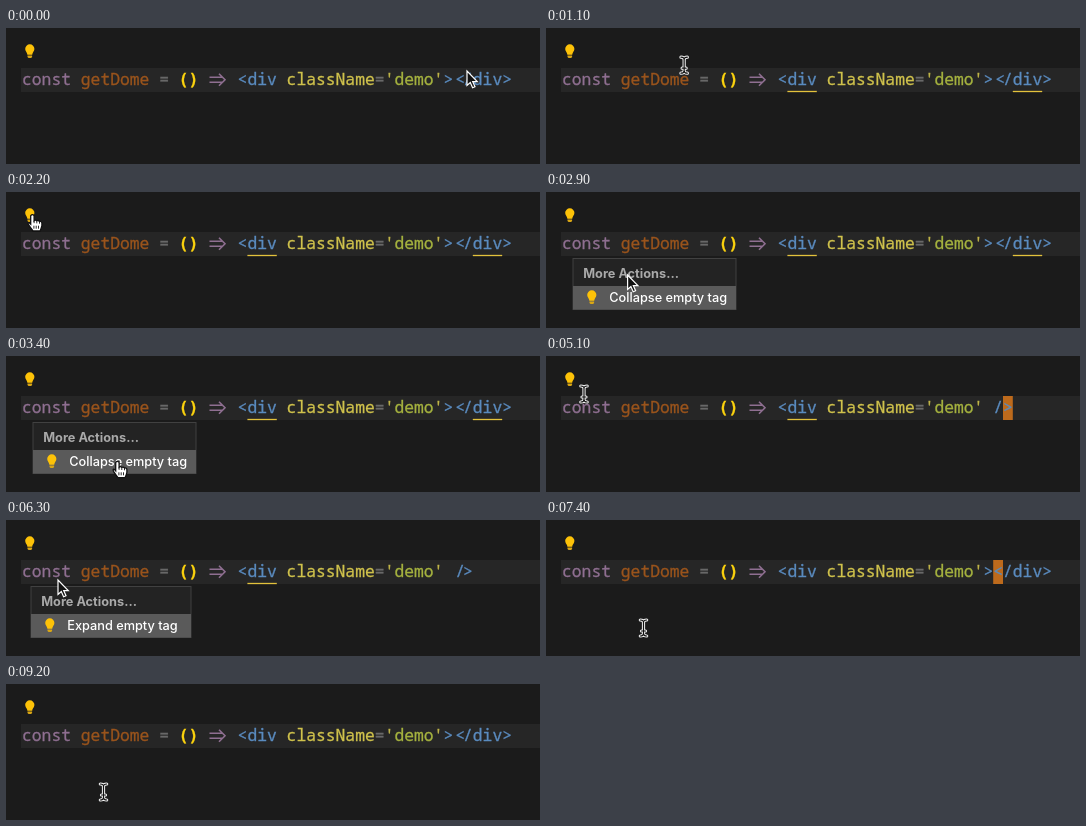
Animation, 534 px wide and 136 px high, one loop 9300 ms. Source, as an HTML page:

```html
<!DOCTYPE html>
<html lang="en">
<head>
<meta charset="utf-8">
<title>Empty tag actions</title>
<style>
html, body { margin: 0; width: 100%; height: 100%; overflow: hidden; background: #1b1b1b; }
svg { display: block; width: 534px; height: 136px; }
#code { font: 500 16.33px "Noto Sans Mono", monospace; }
#code text { stroke-width: .3px; }
#menu { font: 500 12.75px Inter, sans-serif; }
</style>
</head>
<body>
<svg viewBox="0 0 534 136">
  <defs>
    <g id="bulb">
      <path d="M-4.6-2.6A4.6 4.6 0 0 1 4.6-2.6C4.6-.3 2.6 .8 2.4 3.2H-2.4C-2.6 .8-4.6-.3-4.6-2.6Z" fill="#fdc208"/>
      <path d="M-2.3 4H2.3V5.6L1.3 6.6H-1.3L-2.3 5.6Z" fill="#d9a614"/>
    </g>
    <path id="beamLine" d="M-3.2-8Q0-8 0-5.5V5.5Q0 8-3.2 8M3.2-8Q0-8 0-5.5M0 5.5Q0 8 3.2 8M-2 3H2" fill="none" stroke-linecap="round"/>
  </defs>
  <rect x="15" y="40" width="519" height="24" fill="#262626"/>
  <use href="#bulb" x="23.8" y="23.5"/>
  <rect id="block" y="40" width="9.8" height="24" fill="#bd6a1c"/>
  <g id="code">
    <path d="M203.5 49.3H216M203.5 54.3H216M213 45.8L219 51.8L213 57.8" fill="none" stroke="#8f6f91" stroke-width="1.6"/>
  </g>
  <path id="openLine" d="M241.4 63.5H270.8" stroke="#e3c23c" stroke-width="1.3"/>
  <path id="closeLine" d="M466.8 63.5H496.2" stroke="#e3c23c" stroke-width="1.3"/>
  <g id="menu">
    <rect id="panel" x=".5" y="66.5" height="51" fill="#232323" stroke="#414141"/>
    <rect id="row" x=".5" y="94" height="23.5" fill="#5a5a5a"/>
    <text x="10.7" y="85.5" fill="#a9a9a9" font-weight="700">More Actions...</text>
    <use href="#bulb" x="19.3" y="105.5"/>
    <text id="action" x="36.7" y="110" fill="#fff"></text>
  </g>
  <g id="pointer">
    <path id="arrow" d="M0 0V14.5L3.3 11.5 5.6 16.8 8 15.8 5.7 10.6H10.3Z" fill="#111" stroke="#fff" stroke-width="1.2"/>
    <g id="hand" stroke="#111">
      <path d="M-1.8 1Q0-1 1.6 1V6Q3 4.7 4.3 6.1Q6 5.2 7 6.7Q9.4 6.3 9.4 8.5V11Q9 13 7.6 16.3H.5Q-2 13-4 10Q-5 7.5-3.2 8L-1.8 9.5Z" fill="#fff" stroke-width="1.3"/>
      <path d="M1.6 6V8.5M4.3 6.1V8.7M7 6.7V9M1.4 11V14M3.7 11V14M6 11V14" stroke-width=".9"/>
    </g>
    <g id="beam">
      <use href="#beamLine" stroke="#f4f4f4" stroke-width="3.2"/>
      <use href="#beamLine" stroke="#111" stroke-width="1.2"/>
    </g>
  </g>
</svg>
<script>
const LOOP = 9300, STEP = 100, LEFT = 16, CELL = 9.8;
const CLICK = 300, COLLAPSE = 3800, EXPAND = 7300;
const TAG = '#5a8bbf', DIM = '#686868', QUOTE = '#c0b548';
const $ = id => document.getElementById(id);
const column = n => LEFT + n * CELL;
const show = (el, on) => el.setAttribute('visibility', on ? 'visible' : 'hidden');
const set = (el, attrs) => Object.entries(attrs).forEach(([k, v]) => el.setAttribute(k, v));

function token(col, text, color, weight = 500) {
  const el = document.createElementNS('http://www.w3.org/2000/svg', 'text');
  set(el, { x: column(col), y: 57, fill: color, stroke: color, 'font-weight': weight });
  el.textContent = text;
  return $('code').appendChild(el);
}

token(0, 'const', '#8f6f91');
token(6, 'getDome', '#9a541c');
token(14, '=', DIM);
token(16, '()', '#fbd20e', 700);
token(22, '<div', TAG);
token(27, 'className', '#d0c24c');
token(36, '=', DIM);
token(37, "'", QUOTE);
token(38, 'demo', '#a5b23f');
token(42, "'", QUOTE);
const closing = [token(43, '>', TAG), token(46, 'div>', TAG)];
const pair = [token(44, '', TAG), token(45, '', TAG)];

// time, x, y, shape used from that time on
const path = [
  [0, 461, 43, 'arrow'], [300, 461, 46, 'beam'], [400, 455, 48, 'beam'],
  [1000, 150, 40, 'beam'], [1500, 36, 13, 'arrow'], [1900, 26.5, 22.7, 'hand'],
  [2500, 26.5, 22.7, 'arrow'], [3000, 88, 90, 'hand'], [3300, 111.5, 105.3, 'hand'],
  [3700, 111.5, 105.3, 'beam'], [4000, 60, 52, 'beam'], [4500, 38, 38, 'beam'],
  [5100, 38, 38, 'beam'], [5400, 26, 22, 'hand'], [5600, 26, 22, 'arrow'],
  [6000, 52, 60, 'arrow'], [6300, 52, 60, 'arrow'], [6700, 80, 92, 'hand'],
  [7000, 97.5, 108, 'hand'], [7300, 97.5, 108, 'beam'], [LOOP, 97.5, 108, 'beam']
];

function drawPointer(t) {
  const i = path.findIndex(key => key[0] > t);
  const [t0, x0, y0, shape] = path[i - 1], [t1, x1, y1] = path[i];
  const p = (t - t0) / (t1 - t0), e = p * p * (3 - 2 * p);
  set($('pointer'), { transform: `translate(${x0 + (x1 - x0) * e} ${y0 + (y1 - y0) * e})` });
  for (const id of ['arrow', 'hand', 'beam']) show($(id), id === shape);
}

function drawMenu(t) {
  const first = t >= 2400 && t < 3700, second = t >= 5500 && t < EXPAND;
  const width = first ? 164 : 161;
  show($('menu'), first || second);
  set($('menu'), { transform: `translate(${first ? 26.5 : 24.5} 0)` });
  set($('panel'), { width: width - 1 });
  set($('row'), { width: width - 1 });
  $('action').textContent = first ? 'Collapse empty tag' : 'Expand empty tag';
  return first || second;
}

function drawCode(t, menuOpen) {
  const collapsed = t >= COLLAPSE && t < EXPAND;
  const start = [EXPAND, COLLAPSE, CLICK].find(s => t >= s);
  const blockOn = start !== undefined && !menuOpen && Math.floor((t - start) / 500) % 2 === 0;
  show($('block'), blockOn);
  set($('block'), { x: column(start === EXPAND ? 44 : 45) });
  closing.forEach(el => show(el, !collapsed));
  // the two characters join as a ligature unless the block splits them
  pair.forEach((el, i) => {
    el.textContent = (collapsed ? '/>' : '</')[i];
    set(el, { x: column(44 + i) + (i || blockOn ? 0 : 2) });
  });
  show($('openLine'), t >= CLICK && t < EXPAND);
  show($('closeLine'), t >= CLICK && t < COLLAPSE);
}

function frame() {
  const t = Math.floor(performance.now() % LOOP / STEP) * STEP;
  drawCode(t, drawMenu(t));
  drawPointer(t);
  requestAnimationFrame(frame);
}
frame();
</script>
</body>
</html>
```
